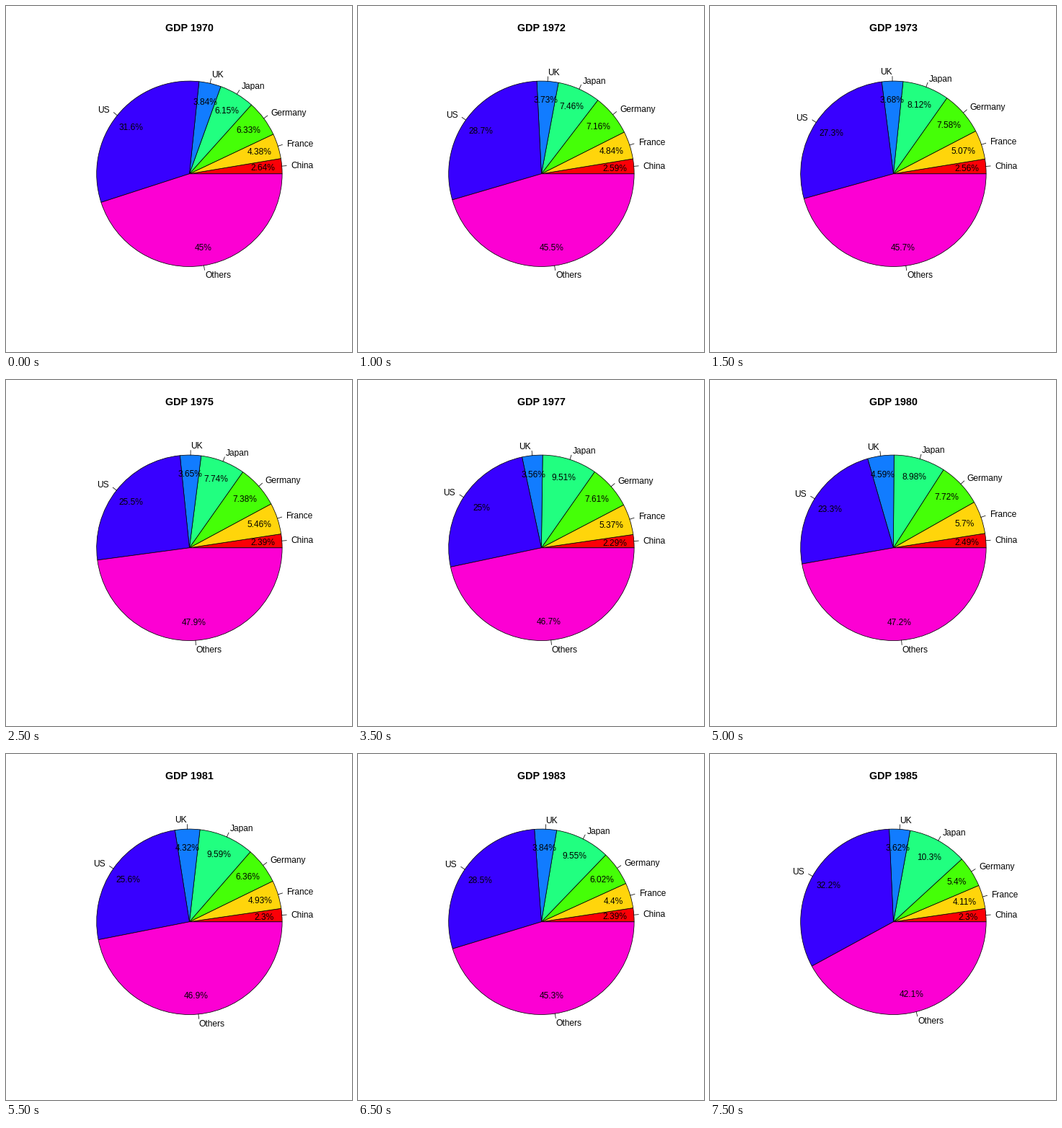
Write a matplotlib script that moves like this. It is 480 px wide and 480 px high and loops after 8000 ms.

```python
import numpy as np
import matplotlib.pyplot as plt
from matplotlib.animation import FuncAnimation
from matplotlib.patches import Wedge

SIZE, DPI = 480, 80
PT = 72 / DPI                      # points per pixel
CX, CY, R = 254.4, 247.2, 128.7
DIGIT = 6.67                       # width of one digit
LINE = 0.75 * PT

plt.rcParams["font.family"] = "Liberation Sans"
plt.rcParams["text.hinting"] = "native"

NAMES = ["China", "France", "Germany", "Japan", "UK", "US", "Others"]
COLORS = ["#fb0007", "#ffd50b", "#45ff07", "#21ff80",
          "#117cff", "#3800ff", "#fc00d3"]

# key years; the years between are interpolated, "Others" is the remainder
FIRST, LAST = 1970, 1985
KEYS = {
    1970: (2.64, 4.38, 6.33, 6.15, 3.84, 31.64),
    1973: (2.56, 5.07, 7.58, 8.12, 3.68, 27.3),
    1975: (2.39, 5.46, 7.38, 7.74, 3.65, 25.5),
    1978: (2.24, 5.32, 7.73, 10.4, 3.52, 24.7),
    1980: (2.49, 5.70, 7.72, 8.98, 4.59, 23.3),
    1981: (2.30, 4.93, 6.36, 9.59, 4.32, 25.6),
    1983: (2.39, 4.40, 6.02, 9.55, 3.84, 28.5),
    1985: (2.30, 4.11, 5.40, 10.3, 3.62, 32.2),
}

fig = plt.figure(figsize=(SIZE / DPI, SIZE / DPI), dpi=DPI, facecolor="white")
ax = fig.add_axes([0, 0, 1, 1])


def shares_in(year):
    named = [np.interp(year, list(KEYS), col) for col in zip(*KEYS.values())]
    return np.array(named + [100 - sum(named)])


def polar(angle, scale):
    a = np.radians(angle)
    return CX + R * scale * np.cos(a), CY + R * scale * np.sin(a)


def write(x, y, text, ha="center", size=12, **style):
    ax.text(x - 0.5, y - 4.2, text, ha=ha, va="baseline", fontsize=size * PT,
            color="black", zorder=5, **style)


def draw_slice(name, color, share, start, end):
    ax.add_patch(Wedge((CX, CY), R, start, end, facecolor=color,
                       edgecolor="black", linewidth=LINE, joinstyle="round"))
    mid = (start + end) / 2
    (x0, y0), (x1, y1) = polar(mid, 1), polar(mid, 1.05)
    ax.plot([x0, x1], [y0, y1], color="black", lw=LINE)

    x, y = polar(mid, 1.1)
    write(x, y, name, ha="left" if x >= CX else "right")

    # numbers are right-aligned in a field of four characters
    number = f"{share:.3g}"
    x, y = polar(mid, 0.8)
    write(x + (4 - len(number)) * DIGIT / 4, y, number + "%")


def draw(i):
    ax.clear()
    ax.set(xlim=(0, SIZE), ylim=(0, SIZE))
    ax.axis("off")
    write(CX + 0.5, SIZE - 30.8, f"GDP {FIRST + i}", size=14.4, weight="bold")
    shares = shares_in(FIRST + i)
    edges = np.concatenate([[0], np.cumsum(shares)]) * 3.6
    for row in zip(NAMES, COLORS, shares, edges[:-1], edges[1:]):
        draw_slice(*row)
    return []


anim = FuncAnimation(fig, draw, frames=LAST - FIRST + 1, interval=500,
                     repeat=True, repeat_delay=0, blit=False)
plt.show()
```
